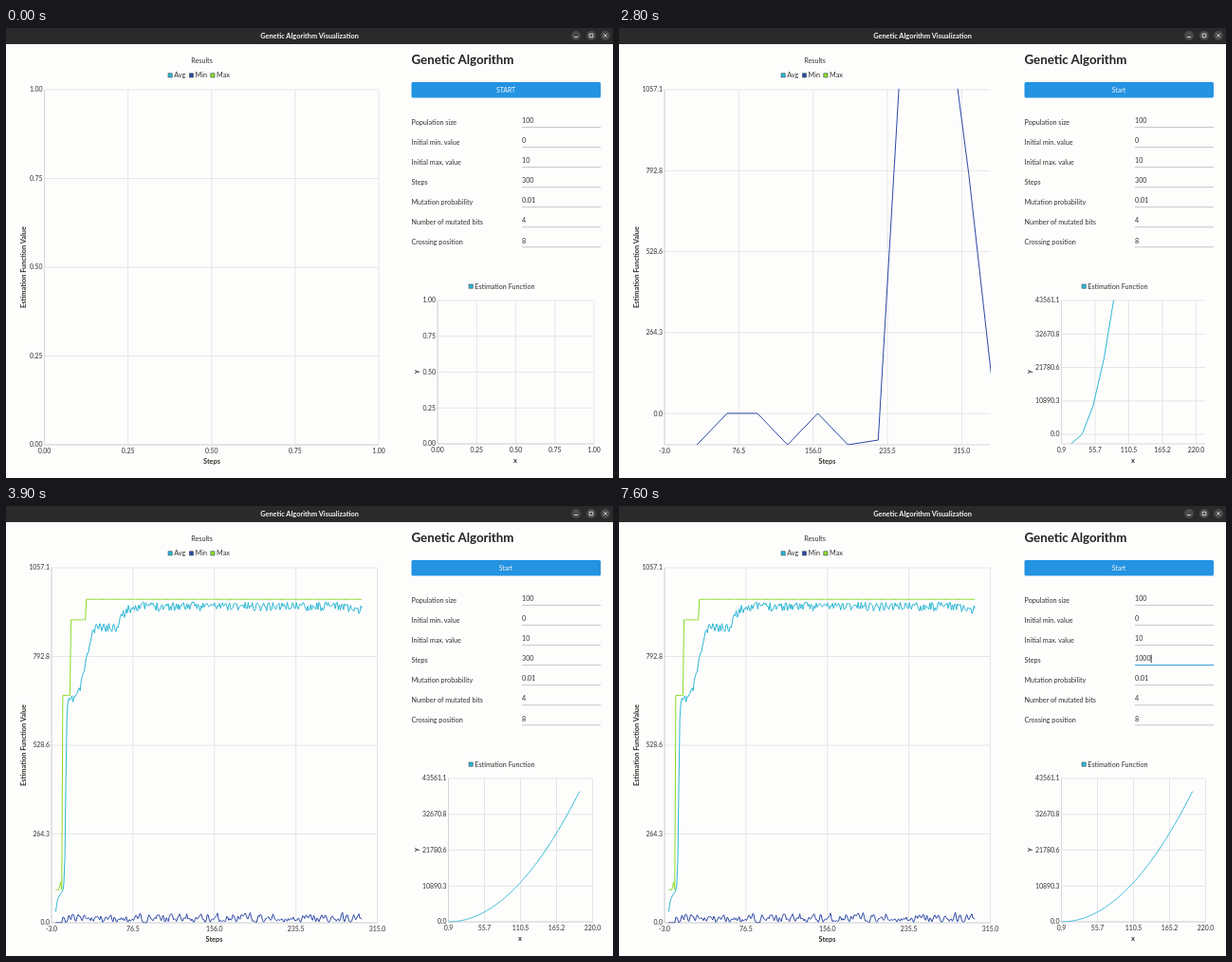
Recreate the animation shown at these times as an HTML page. Size 640 by 474 pixels, loop 8 s.

```html
<!DOCTYPE html>
<html lang="en">
<head>
<meta charset="utf-8">
<title>Genetic Algorithm Visualization</title>
<style>
  html, body { margin: 0; width: 100%; height: 100%; overflow: hidden; background: #fdfdfc; }
  svg { display: block; width: 100%; height: 100%; }
  text { font: 7.2px Lato, "Open Sans", sans-serif; fill: #35322f; white-space: pre; }
  .bold { font-weight: 700; font-size: 7.4px; }
  .tick { font-size: 6.9px; }
  .mid { text-anchor: middle; }
  .end { text-anchor: end; }
  .light { fill: #f6f6f6; }
  .head { font-size: 13.3px; font-weight: 700; fill: #222; }
  .grid { stroke: #e6e6ea; stroke-width: 1; }
  .axis { stroke: #d7d6d8; stroke-width: 1; }
  .series { fill: none; stroke-width: 1; stroke-linejoin: round; }
</style>
</head>
<body>
<svg id="stage" viewBox="0 0 640 474" preserveAspectRatio="none">
  <defs>
    <clipPath id="clipMain"><rect x="48" y="64" width="344" height="375.5"/></clipPath>
    <clipPath id="clipFn"><rect x="466" y="286.5" width="153" height="152"/></clipPath>
  </defs>
  <rect width="640" height="474" fill="#fdfdfc"/>
  <rect width="640" height="17" fill="#2a2a2a"/>
  <text class="bold light mid" x="320" y="11">Genetic Algorithm Visualization</text>
  <g fill="#4a4a4a">
    <circle cx="601" cy="8" r="4.9"/><circle cx="617" cy="8" r="4.9"/><circle cx="632" cy="8" r="4.9"/>
  </g>
  <path d="M599 9.5h4M615.2 6.2h3.6v3.6h-3.6zM630.3 6.3l3.4 3.4m0-3.4l-3.4 3.4" fill="none" stroke="#f0f0f0" stroke-width=".8"/>

  <text class="mid" x="206.5" y="37">Results</text>
  <g id="legend"></g>
  <text class="bold mid" transform="translate(20.5 252) rotate(-90)">Estimation Function Value</text>
  <text class="bold mid" transform="translate(435 362) rotate(-90)">y</text>
  <text class="bold mid" id="titleX" y="458.5">Steps</text>
  <text class="bold mid" id="titleFn" y="457.5">x</text>
  <g id="axes"></g>
  <g clip-path="url(#clipMain)" id="mainLines"></g>
  <g clip-path="url(#clipFn)" id="fnLines"></g>

  <text class="head" x="427.5" y="38">Genetic Algorithm</text>
  <rect x="427.5" y="57" width="199.5" height="16.5" rx="1.5" fill="#2393e2"/>
  <text class="light mid" id="button" x="527" y="67.8" style="font-size:6.9px"></text>
  <g id="form"></g>
  <rect id="caret" y="156.5" width=".9" height="8.5" fill="#222"/>
</svg>
<script>
const LOOP = 8000, STEP = 100;
const COLORS = { Avg: '#2db6d4', Min: '#2c48a4', Max: '#8cda26', fn: '#2db6d4' };
const $ = id => document.getElementById(id);
const text = (x, y, s, cls = '') => `<text x="${x}" y="${y}" class="${cls}">${s}</text>`;
const line = (x1, y1, x2, y2, cls) => `<path class="${cls}" d="M${x1} ${y1}L${x2} ${y2}"/>`;

// linear interpolation through [position, value] pairs
function along(pts, x) {
  if (x <= pts[0][0]) return pts[0][1];
  for (let i = 1; i < pts.length; i++) {
    const [a, u] = pts[i - 1], [b, v] = pts[i];
    if (x <= b) return u + (v - u) * (x - a) / (b - a);
  }
  return pts[pts.length - 1][1];
}
// last value whose start time has passed
const latest = (list, t) => list.reduce((r, [at, v]) => t >= at ? v : r, list[0][1]);

let seed = 11;
const rand = () => (seed = seed * 16807 % 2147483647) / 2147483647;

// noise in which neighbours share half of their value
let last = 0;
function softNoise() {
  const next = rand(), mean = (last + next) / 2;
  last = next;
  return mean;
}

// data
const steps = Array.from({ length: 300 }, (_, i) => i + 1);
const minHead = [0, 1, 1, 0, 1, 0, .15, 16.5, 16, 8.6, 0];
const avgPath = [[1, 33], [2, 52], [3, 70], [5, 82], [8, 96], [9, 115], [10, 190], [11, 420],
  [12, 610], [13, 656], [20, 672], [25, 696], [28, 746], [31, 780], [34, 825], [37, 862],
  [41, 880], [60, 880], [64, 908], [71, 933], [80, 943], [285, 943], [295, 925], [300, 935]];
const maxHead = [98, 98, 98, 98, 110, 122, 98];
const data = {
  Avg: steps.map(s => along(avgPath, s) + (s > 13 ? 11 - 26 * rand() ** 1.4 : 0)),
  Min: steps.map(s => minHead[s - 1] ?? 33 * softNoise() ** 1.5),
  Max: steps.map(s => maxHead[s - 1] ?? (s < 16 ? 677 : s < 31 ? 902 : 963)),
};
const fnSteps = steps.slice(0, 200);
const fnData = fnSteps.map(s => (s - 1) ** 2);

// plot areas: pixel box plus axis range; "from" is the unit range shown at first
const unit = ['0.00', '0.25', '0.50', '0.75', '1.00'];
const main = {
  from: { l: 40.5, r: 393, t: 65, b: 439, x0: 0, x1: 1, y1: 1, xs: unit, ys: unit },
  to: { l: 48, r: 391.5, t: 65, b: 439, x0: -3, x1: 315, y1: 1057.1,
    xs: ['-3.0', '76.5', '156.0', '235.5', '315.0'], ys: ['0.0', '264.3', '528.6', '792.8', '1057.1'] },
};
const fn = {
  from: { l: 455, r: 620, t: 287, b: 438, x0: 0, x1: 1, y1: 1, xs: unit, ys: unit },
  to: { l: 466.5, r: 618.5, t: 287, b: 438, x0: .9, x1: 220, y1: 43561.1,
    xs: ['0.9', '55.7', '110.5', '165.2', '220.0'], ys: ['0.0', '10890.3', '21780.6', '32670.8', '43561.1'] },
};

// ticks spread from the top left corner while p goes from 0 to 1
function axes(a, p) {
  let grid = '', labels = '';
  for (let i = 0; i < 5; i++) {
    const x = a.l + (a.r - a.l) * p * i / 4;
    const y = a.t + (a.b - a.t) * p * i / 4;
    grid += line(x, a.t, x, a.b, 'grid') + line(a.l, y, a.r, y, 'grid');
    labels += text(x, a.b + 9, a.xs[i], 'tick mid') + text(a.l - 2, y + 2.4, a.ys[4 - i], 'tick end');
  }
  return grid + line(a.l, a.t, a.l, a.b, 'axis') + line(a.l, a.b, a.r, a.b, 'axis') + labels;
}

// points slide from their place in the first range to that in the last
function series(plot, xs, ys, p, color) {
  const put = (a, x, y) => [
    a.l + (a.r - a.l) * (x - a.x0) / (a.x1 - a.x0),
    a.b - (a.b - a.t) * y / a.y1,
  ];
  const pts = xs.map((x, i) => {
    const u = put(plot.from, x, ys[i]), v = put(plot.to, x, ys[i]);
    return u.map((c, k) => (c + (v[k] - c) * p).toFixed(2)).join(' ');
  });
  return `<path class="series" stroke="${color}" d="M${pts.join('L')}"/>`;
}

// static parts
const key = (x, y, s, color) =>
  `<rect x="${x}" y="${y}" width="4.2" height="4.2" fill="${color}" stroke="#3a5560" stroke-width=".6"/>` + text(x + 6.3, y + 4.6, s);
$('legend').innerHTML = key(171, 47.8, 'Avg', COLORS.Avg) + key(193.3, 47.8, 'Min', COLORS.Min) +
  key(215.8, 47.8, 'Max', COLORS.Max) + key(488, 270, 'Estimation Function', COLORS.fn);
const fields = [['Population size', 100], ['Initial min. value', 0], ['Initial max. value', 10],
  ['Steps', 300], ['Mutation probability', 0.01], ['Number of mutated bits', 4], ['Crossing position', 8]];
$('form').innerHTML = fields.map(([name, value], i) => {
  const y = 101.6 + 21.05 * i;
  return text(427.5, y, name) + text(544, y - 1.4, value, 'value') +
    `<path class="rule" d="M544 ${y + 2.9}H627" stroke="#c6c6cc"/>`;
}).join('');
const stepsValue = document.querySelectorAll('.value')[3];
const stepsRule = document.querySelectorAll('.rule')[3];

// timing
const START = 2400, FOCUS = 5200;
const progress = [[2400, .035], [2800, .456], [3200, .791], [3400, 1]];
const outQuart = u => 1 - (1 - Math.min(u, 1)) ** 4;
const typed = [[0, '300'], [6300, '30'], [6500, '3'], [6600, ''], [6800, '1'],
  [7100, '10'], [7200, '100'], [7600, '1000']];
const rules = [[0, ['#c6c6cc', 1]], [4300, ['#333', 1.4]], [FOCUS, ['#2b98e0', 1]]];

let shown = '';
function drawCharts(t) {
  const on = t >= START;
  const u = along(progress, t);
  const id = on ? u : 'empty';
  if (id === shown) return;
  shown = id;
  const p = outQuart(u), q = outQuart(u + .037);
  $('axes').innerHTML = on ? axes(main.to, p) + axes(fn.to, q) : axes(main.from, 1) + axes(fn.from, 1);
  $('titleX').setAttribute('x', on ? 219.5 : 217);
  $('titleFn').setAttribute('x', on ? 542 : 537);
  $('mainLines').innerHTML = on ? Object.keys(data).map(k => series(main, steps, data[k], p, COLORS[k])).join('') : '';
  $('fnLines').innerHTML = on ? series(fn, fnSteps, fnData, q, COLORS.fn) : '';
}

function draw(now) {
  const t = Math.floor(now % LOOP / STEP) * STEP;
  drawCharts(t);
  $('button').textContent = t < 2300 ? 'START' : 'Start';
  const value = latest(typed, t);
  stepsValue.textContent = value;
  const [color, width] = latest(rules, t);
  stepsRule.setAttribute('stroke', color);
  stepsRule.setAttribute('stroke-width', width);
  $('caret').setAttribute('x', 544 + (value ? stepsValue.getComputedTextLength() : 0));
  $('caret').setAttribute('visibility', t >= FOCUS ? 'visible' : 'hidden');
}

const origin = performance.now();
function tick() {
  draw(performance.now() - origin);
  requestAnimationFrame(tick);
}
tick();
</script>
</body>
</html>
```
